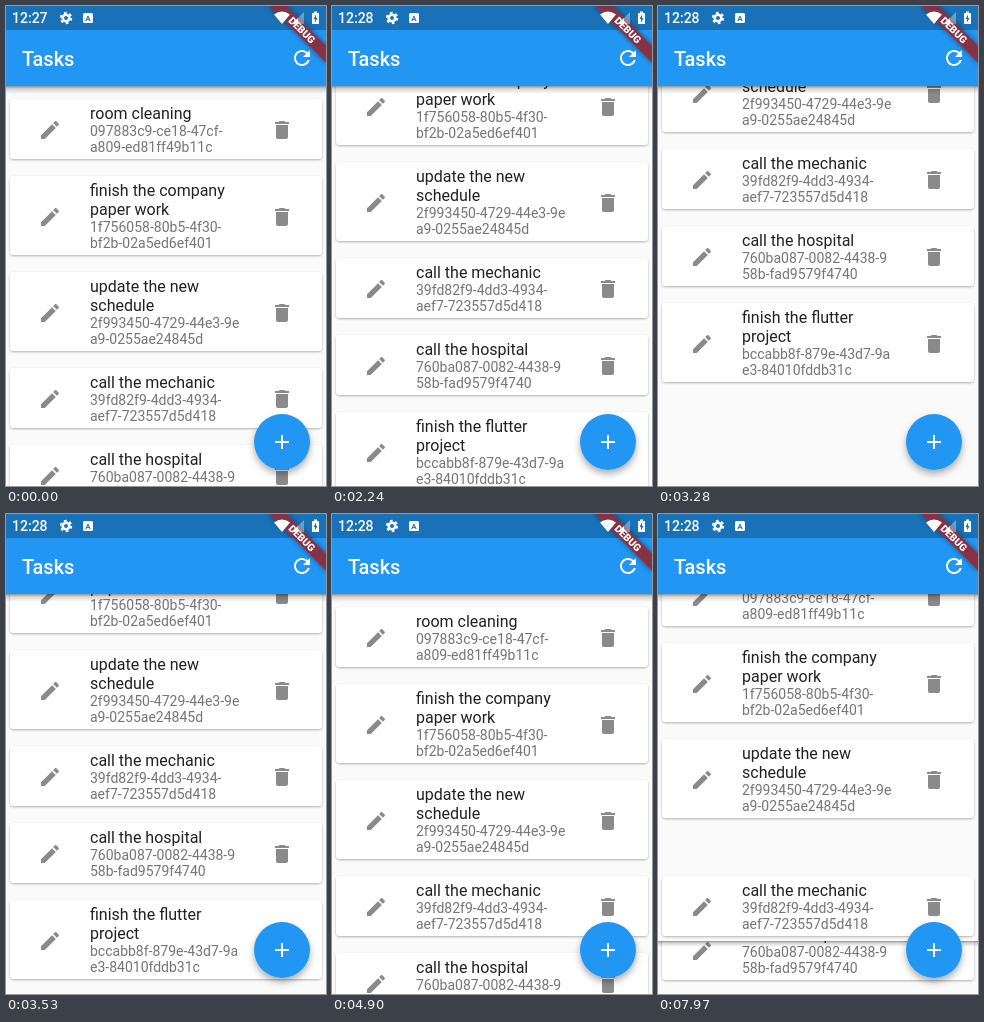
Recreate the animation shown at these times as an HTML page. Size 320x480 px, loop 8 s.

```html
<!DOCTYPE html>
<html lang="en">
<head>
<meta charset="utf-8">
<title>Tasks</title>
<style>
  html, body { margin: 0; width: 100%; height: 100%; overflow: hidden; background: #fafafa; }
  svg { display: block; width: 100%; height: 100%; font-family: Roboto, Arial, sans-serif; }
  .title { font-size: 16px; fill: #212121; }
  .note { font-size: 14px; fill: #757575; }
  .icon { fill: #8a8a8a; }
  .card { fill: #fff; filter: url(#cardShadow); }
</style>
</head>
<body>
<svg id="stage" viewBox="0 0 320 480">
  <defs>
    <linearGradient id="shade" x2="0" y2="1">
      <stop offset="0" stop-opacity=".42"/>
      <stop offset=".35" stop-opacity=".16"/>
      <stop offset="1" stop-opacity="0"/>
    </linearGradient>
    <filter id="cardShadow" x="-5%" y="-10%" width="110%" height="130%">
      <feDropShadow dx="0" dy="1" stdDeviation=".9" flood-opacity=".3"/>
    </filter>
    <filter id="fabShadow" x="-40%" y="-40%" width="180%" height="190%">
      <feDropShadow dx="0" dy="4" stdDeviation="3.5" flood-opacity=".32"/>
    </filter>
    <filter id="bannerShadow" x="-20%" y="-80%" width="140%" height="260%">
      <feDropShadow dx="0" dy="0" stdDeviation="2.5" flood-opacity=".5"/>
    </filter>
  </defs>

  <rect width="320" height="480" fill="#fafafa"/>
  <g id="list"></g>
  <path id="glow" fill="#2196f3"/>
  <rect y="80" width="320" height="8" fill="url(#shade)"/>

  <rect width="320" height="80" fill="#2196f3"/>
  <rect width="320" height="24" fill="#1971b7"/>
  <g fill="#fff">
    <text x="16" y="60" font-size="20" font-weight="500">Tasks</text>
    <path transform="translate(284 40)" d="M17.65 6.35C16.2 4.9 14.21 4 12 4c-4.42 0-7.99 3.58-7.99 8s3.57 8 7.99 8c3.73 0 6.84-2.55 7.73-6h-2.08c-.82 2.33-3.04 4-5.65 4-3.31 0-6-2.69-6-6s2.69-6 6-6c1.66 0 3.14.69 4.22 1.78L13 11h7V4l-2.35 2.35z"/>
  </g>

  <circle cx="276" cy="436" r="28" fill="#2196f3" filter="url(#fabShadow)"/>
  <path d="M269 436h14M276 429v14" stroke="#fff" stroke-width="2"/>

  <g transform="translate(320 0) rotate(45)">
    <rect x="-40" y="28" width="80" height="12" fill="#863144" filter="url(#bannerShadow)"/>
    <text y="37.7" font-size="10.2" font-weight="900" text-anchor="middle" fill="#fff">DEBUG</text>
  </g>

  <g fill="#fff">
    <text id="clock" x="6" y="17" font-size="14" font-weight="500"></text>
    <g transform="translate(60 12)" fill="none" stroke="#fff">
      <circle r="3.3" stroke-width="2.6"/>
      <circle r="5.2" stroke-width="2" stroke-dasharray="2.7 2.745"/>
    </g>
    <rect x="77" y="7" width="10" height="10" rx="1.5"/>
    <text x="82" y="15" font-size="8" font-weight="700" text-anchor="middle" fill="#1971b7">A</text>
    <path d="M268 8.5Q276 2.5 284 8.5L276 18Z"/>
    <path d="M286 18L298 6V18Z" opacity=".35"/>
    <path d="M286 18L292 12V18Z"/>
    <path d="M306 7h2V5.5h3V7h2V18h-7Z"/>
    <path d="M310 8.500l-2.500 4.500h1.500v3.500l2.500-4.500h-1.500Z" fill="#1971b7"/>
  </g>
</svg>
<script>
const LOOP = 8000;
const PENCIL = 'M3 17.25V21h3.75L17.81 9.94l-3.75-3.75L3 17.25zM20.71 7.04c.39-.39.39-1.02 0-1.41l-2.34-2.34c-.39-.39-1.02-.39-1.41 0l-1.83 1.83 3.75 3.75 1.83-1.83z';
const TRASH = 'M6 19c0 1.1.9 2 2 2h8c1.1 0 2-.9 2-2V7H6v12zM19 4h-3.5l-1-1h-5l-1 1H5v2h14V4z';

const tasks = [
  [['room cleaning'], ['097883c9-ce18-47cf-', 'a809-ed81ff49b11c']],
  [['finish the company', 'paper work'], ['1f756058-80b5-4f30-', 'bf2b-02a5ed6ef401']],
  [['update the new', 'schedule'], ['2f993450-4729-44e3-9e', 'a9-0255ae24845d']],
  [['call the mechanic'], ['39fd82f9-4dd3-4934-', 'aef7-723557d5d418']],
  [['call the hospital'], ['760ba087-0082-4438-9', '58b-fad9579f4740']],
  [['finish the flutter', 'project'], ['bccabb8f-879e-43d7-9a', 'e3-84010fddb31c']]
];
const LIFTED = 3;

const $ = id => document.getElementById(id);
function add(parent, tag, attrs, text) {
  const node = document.createElementNS('http://www.w3.org/2000/svg', tag);
  for (const key in attrs) node.setAttribute(key, attrs[key]);
  if (text) node.textContent = text;
  return parent.appendChild(node);
}

let nextTop = 93;
const cards = tasks.map(([title, note], index) => {
  const height = 41 + 19 * title.length;
  const group = add($('list'), 'g', {});
  const backing = index === LIFTED && add(group, 'g', {});
  if (backing) {
    add(backing, 'rect', { y: -8, width: 320, height: 73, fill: '#fafafa' });
    add(backing, 'rect', { y: 65, width: 320, height: 6, fill: 'url(#shade)' });
  }
  add(group, 'rect', { class: 'card', x: 4, width: 312, height, rx: 4 });
  title.forEach((line, i) => add(group, 'text', { class: 'title', x: 84, y: 20 + 19 * i }, line));
  note.forEach((line, i) => add(group, 'text', { class: 'note', x: 84, y: 18 + 19 * title.length + 16 * i }, line));
  const iconY = Math.round(height / 2 + 1) - 12;
  add(group, 'path', { class: 'icon', d: PENCIL, transform: `translate(32 ${iconY})` });
  add(group, 'path', { class: 'icon', d: TRASH, transform: `translate(264 ${iconY})` });
  const card = { group, backing, top: nextTop };
  nextTop += height + 17;
  return card;
});
$('list').appendChild(cards[LIFTED].group);

const clamp = v => Math.max(0, Math.min(1, v));
const progress = (t, start, end) => clamp((t - start) / (end - start));

// A finger drag that gathers speed, then glides to rest.
const glide = u => 1 - (1 - u ** 1.3) ** 3;

// start, end, distance
const flings = [
  [80, 790, 171], [910, 1290, -171],
  [2000, 2620, 170], [2910, 3270, 49],
  [3400, 3860, -185], [4190, 4520, -34]
];
const scrollAt = t => flings.reduce((sum, [start, end, by]) => sum + by * glide(progress(t, start, end)), 0);

// start, end, depth
const pulls = [[4690, 4900, 26], [5270, 6100, 48], [6100, 7010, 26]];

function drawGlow(t) {
  const pull = pulls.find(([start, end]) => t >= start && t < end);
  const swell = pull ? Math.sin(Math.PI * progress(t, pull[0], pull[1])) : 0;
  const depth = pull ? pull[2] * swell : 0;
  $('glow').setAttribute('d', `M0 80H320Q160 ${80 + 2 * depth} 0 80Z`);
  $('glow').setAttribute('opacity', 0.1 * swell);
}

function draw(t) {
  $('clock').textContent = t < 800 ? '12:27' : '12:28';
  const scroll = scrollAt(t);
  const lift = progress(t, 7850, 7970);
  cards.forEach(({ group, backing, top }, index) => {
    const shift = index < LIFTED ? 41 : index > LIFTED ? 33 : 0;
    group.setAttribute('transform', `translate(0 ${Math.round(top - scroll - shift * lift)})`);
    if (backing) backing.setAttribute('visibility', lift > 0 ? 'visible' : 'hidden');
  });
  drawGlow(t);
}

const origin = performance.now();
function tick() {
  draw((performance.now() - origin) % LOOP);
  requestAnimationFrame(tick);
}
tick();
</script>
</body>
</html>
```
